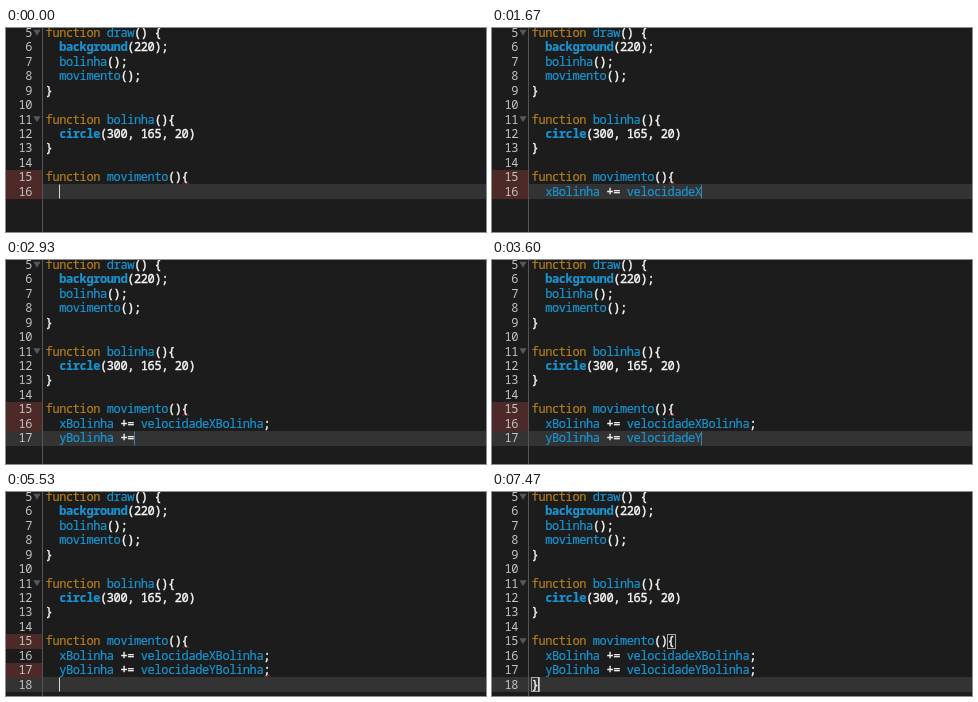
Write an HTML page that moves like this. It is 480 px wide and 204 px high and loops after 8000 ms.

```html
<!DOCTYPE html>
<html lang="pt">
<head>
<meta charset="utf-8">
<title>Editor</title>
<style>
  html, body { margin: 0; width: 100%; height: 100%; overflow: hidden; background: #1c1c1c; }
  svg { display: block; width: 100vw; height: 100vh; }
  text {
    font: 12px "Noto Sans Mono", "DejaVu Sans Mono", monospace;
    letter-spacing: -0.4px; white-space: pre;
    color: #f8f8f8; fill: currentColor;
  }
  tspan { fill: currentColor; stroke: currentColor; stroke-width: 0.2; }
  .op { stroke-width: 0.4; }
  .kw { color: #b47f1b; }
  .id, .fn { color: #1795d3; }
  .fn { font-weight: bold; }
  .num { color: #c4c4c4; text-anchor: end; }
  .match { fill: none; stroke: #a8a8a8; }
  .wave { fill: none; stroke: #d8382c; opacity: 0.7; }
</style>
</head>
<body>
<svg id="stage" viewBox="0 0 480 204"></svg>
<script>
const LOOP = 8000, CW = 6.8, LH = 14.45, LEFT = 39.8, FIRST = 5, ROW = 15;
const stage = document.getElementById('stage');

const rowTop = n => 156.6 + (n - 16) * LH;
const rowPixel = n => Math.floor(rowTop(n));
const colX = c => LEFT + c * CW;

function add(tag, attrs, parent = stage) {
  const el = document.createElementNS('http://www.w3.org/2000/svg', tag);
  for (const k in attrs) el.setAttribute(k, attrs[k]);
  return parent.appendChild(el);
}
const show = (el, on) => el.setAttribute('visibility', on ? 'visible' : 'hidden');

const code = [
  'function draw() {',
  '  background(220);',
  '  bolinha();',
  '  movimento();',
  '}',
  '',
  'function bolinha(){',
  '  circle(300, 165, 20)',
  '}',
  '',
  'function movimento(){',
  '  xBolinha += velocidadeXBolinha;',
  '  yBolinha += velocidadeYBolinha;',
  '}'
];

// Typing runs: start time, count, end time, count
const typing = {
  16: [[70, 1, 130, 2], [270, 3, 530, 6], [670, 8, 730, 10], [870, 11, 1670, 23], [1730, 24, 2130, 31]],
  17: [[2330, 1, 2330, 1], [2470, 2, 3270, 19], [3330, 20, 3330, 20], [3470, 21, 3600, 23],
       [3730, 24, 3730, 24], [4070, 25, 4470, 30], [4730, 31, 4730, 31]],
  18: [[6470, 1, 6470, 1]]
};
const newline = { 17: 2200, 18: 5530 };

// Last row flagged by the linter, besides row 15
const lint = [[0, 16], [5270, 17], [6070, 18], [6800, 0]];
const caretOff = [[5130, 5530], [6070, 6470], [7000, 7470]];

function typed(n, t) {
  let count = 0;
  for (const [t0, c0, t1, c1] of typing[n]) {
    if (t < t0) break;
    const p = t1 > t0 ? Math.min(1, (t - t0) / (t1 - t0)) : 1;
    count = Math.floor(c0 + (c1 - c0) * p + 1e-6);
  }
  return count;
}

function style(word) {
  if (word === 'function') return 'kw';
  if (/^(background|circle)$/.test(word)) return 'fn';
  return /^[a-z]/i.test(word) ? 'id' : 'op';
}

function setText(el, str) {
  if (el.shown === str) return;
  el.shown = str;
  el.textContent = '';
  for (const m of str.matchAll(/[a-z]+|[^a-z\s]+/gi))
    add('tspan', { x: colX(m.index) - 0.2, class: style(m[0]) }, el).textContent = m[0];
}

function wave(n, col) {
  const y = rowTop(n) + 12.4;
  return add('path', { class: 'wave', d: `M${colX(col) + 1} ${y + 1}l1.5-1.2 1.5 1.2 1.5-1.2 1.5 1.2` });
}

function bracketBox(n, col) {
  return add('rect', { class: 'match', x: Math.round(colX(col)) - 0.5, y: rowPixel(n) + 0.5, width: 8, height: 14 });
}

const foldMark = n => add('path', { fill: '#585858', d: `M27.4 ${rowTop(n) + 4}h7.2l-3.6 6z` });

add('rect', { width: 480, height: 204, fill: '#1c1c1c' });
const active = add('rect', { width: 480, height: ROW, fill: '#333333' });
const flags = [15, 16, 17, 18].map(n =>
  add('rect', { y: rowPixel(n), width: 36, height: ROW, fill: '#4d2927' }));
add('rect', { x: 36, width: 1, height: 204, fill: '#555555' });

const rows = code.map((str, i) => {
  const n = FIRST + i, y = rowTop(n) + 11.2;
  const num = add('text', { class: 'num', x: 26, y });
  num.textContent = n;
  const line = add('text', { y });
  if (!typing[n]) setText(line, str);
  return { n, str, num, line };
});

[5, 11].forEach(foldMark);
const newFold = foldMark(15);
const openWave = wave(15, 20), endWave = wave(17, 32);
const boxes = [bracketBox(15, 20), bracketBox(18, 0)];
const caret = add('rect', { width: 1, height: 14 });

function render(time) {
  const t = time + 8;
  const current = t >= newline[18] ? 18 : t >= newline[17] ? 17 : 16;
  const flagged = lint.filter(e => t >= e[0]).pop()[1];
  const count = typed(current, t);
  const closed = current === 18 && count > 0;

  for (const { n, str, num, line } of rows) {
    if (!typing[n]) continue;
    const indent = n < 18 ? 2 : 0;
    show(num, n <= current);
    setText(line, str.slice(0, indent + typed(n, t)));
  }

  active.setAttribute('y', rowPixel(current));
  flags.forEach((el, i) => show(el, flagged && (i === 0 || i + 15 === flagged)));
  show(openWave, flagged);
  show(endWave, flagged === 17);
  show(newFold, !flagged);
  boxes.forEach(el => show(el, closed));

  const col = closed ? 1 : 2 + count;
  caret.setAttribute('x', Math.round(colX(col) - 0.4));
  caret.setAttribute('y', rowPixel(current) + 0.5);
  caret.setAttribute('fill', count && !closed ? '#3c86ab' : '#d8d8d8');
  show(caret, !caretOff.some(([a, b]) => t >= a && t < b));
}

const start = performance.now();
function tick() {
  render((performance.now() - start) % LOOP);
  requestAnimationFrame(tick);
}
render(0);
requestAnimationFrame(tick);
</script>
</body>
</html>
```
